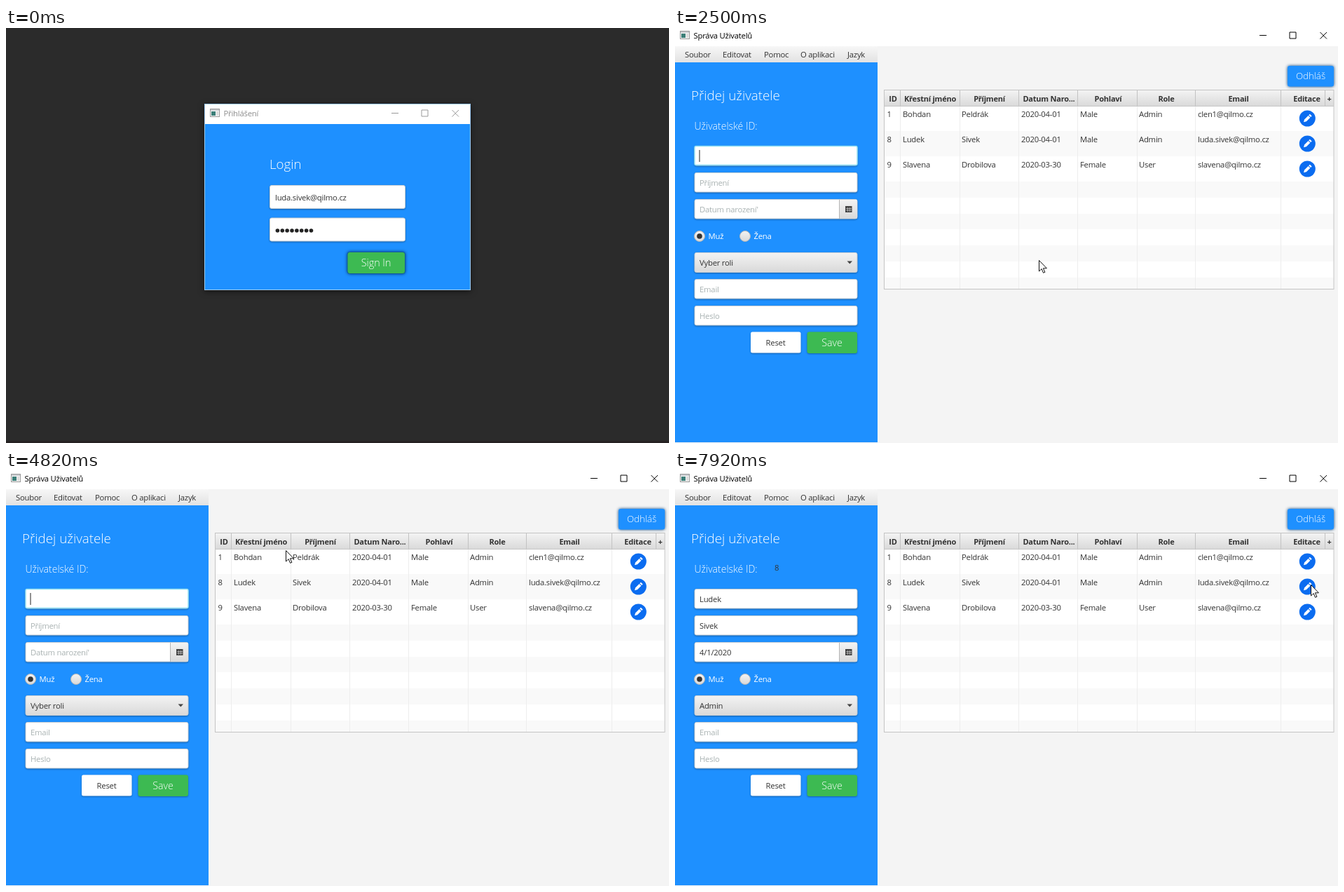
Write an HTML page that moves like this. It is 946 px wide and 592 px high and loops after 8000 ms.

```html
<!DOCTYPE html>
<html lang="cs">
<head>
<meta charset="utf-8">
<title>Správa Uživatelů</title>
<style>
html, body { margin: 0; width: 100%; height: 100%; overflow: hidden; background: #2b2b2b; }
svg { display: block; font: 11.3px "Open Sans", "Noto Sans", sans-serif; letter-spacing: -.02em; }
text { white-space: pre; }
.light { font-weight: 300; letter-spacing: 0; fill: #fff; }
.bold { font-weight: 700; font-size: 11px; }
.mid { text-anchor: middle; }
.glow { filter: drop-shadow(0 0 2px #003c78); }
.soft { filter: drop-shadow(0 1px 1px #0005); }
</style>
</head>
<body>
<svg id="stage" width="946" height="592" viewBox="0 0 946 592"></svg>
<script>
const BLUE = '#1e90ff', GREEN = '#3dba52', INK = '#333', HINT = '#a9b2b2';

const rect = (x, y, w, h, fill, extra = '') =>
  `<rect x="${x}" y="${y}" width="${w}" height="${h}" fill="${fill}" ${extra}/>`;
const text = (x, y, s, cls = '', size = '', fill = INK, id = '') =>
  `<text x="${x}" y="${y}" class="${cls}" fill="${fill}" id="${id}" ${size && `style="font-size:${size}px"`}>${s}</text>`;
const path = (d, stroke, extra = '') => `<path d="${d}" fill="none" stroke="${stroke}" ${extra}/>`;
const field = (x, y, w, h, fill = '#fff') =>
  rect(x + .5, y + .5, w - 1, h - 1, fill, 'rx="2.5" stroke="#c3cdd6" class="soft"');

// Window icon, title and the three window buttons
const titleBar = (x, y, right, title, id = '') =>
  rect(x + .5, y + .5, 13, 11, '#f4f4f4', 'stroke="#999"') +
  rect(x + 1, y + 1, 12, 2, '#c9ccd0') + rect(x + 2, y + 4, 6, 6, '#3c7f78') + rect(x + 9, y + 4, 3, 6, '#dcdcdc') +
  text(x + 19.5, y + 11, title, '', '', '#000', id) +
  path(`M${right - 97} ${y + 6.5}h10m33-4.5h9v9h-9zm43.5 0l9.5 9.5m0-9.5l-9.5 9.5`, '#000', `id="${id}Buttons"`);

const login =
  rect(0, 0, 946, 592, '#2b2b2b') + rect(0, 589, 946, 3, '#262223') +
  rect(283, 108, 380, 266, '#9fcdf8', 'id="frame"') +
  rect(284, 109, 378, 28, '#fff') + rect(284, 137, 378, 236, BLUE) +
  titleBar(291, 115, 647, '', 'caption') +
  text(376, 201, 'Login', 'light', 18.7) +
  field(376, 224, 194, 34) + field(376, 270.5, 194, 34) +
  text(384, 246, 'luda.sivek@qilmo.cz') +
  Array.from({ length: 8 }, (_, i) => `<circle cx="${387.4 + 6.87 * i}" cy="289" r="2.8" fill="#222"/>`).join('') +
  rect(487, 319.5, 82.5, 31, GREEN, 'id="signIn" rx="3.5" stroke="#12599f" class="glow"') +
  text(528, 340, 'Sign In', 'light mid', 14.3);

const menu = [[14, 'Soubor'], [68, 'Editovat'], [127, 'Pomoc'], [179, 'O aplikaci'], [246, 'Jazyk']]
  .map(([x, s]) => text(x, 42, s)).join('');

const radio = (x, label) =>
  `<circle cx="${x}" cy="297" r="7.5" fill="url(#grey)" stroke="#b5b5b5"/>` + text(x + 12.5, 301, label, '', '', '#fff');

const form =
  rect(0, 49, 289, 542, BLUE) +
  text(23, 103, 'Přidej uživatele', 'light', 18.8) +
  text(27.5, 145, 'Uživatelské ID:', 'light', 14) + text(142, 142, '', '', '', INK, 'userId') +
  [168, 206, 244, 358, 396].map(y => field(27.5, y, 233, 28.5)).join('') +
  rect(28, 168.5, 232, 27, '#fff', 'id="focus" rx="2" stroke="#8fe0f4" stroke-width="1.4"') +
  rect(34.5, 174, 1, 17, '#222', 'id="caret"') +
  text(35, 187, '', '', '', INK, 'first') + text(35, 225, '', '', '', INK, 'last') + text(35, 263, '', '', '', INK, 'birth') +
  path('M234.5 245v27', '#b5b5b5') + rect(235, 245, 24.5, 27, 'url(#grey)') +
  rect(243, 254, 9.5, 9, '#444') + path('M244 257.5h8m-8 2.5h8m-5.5-4v6m3-6v6', '#ccc', 'stroke-width=".7"') +
  radio(35, 'Muž') + radio(100, 'Žena') + '<circle cx="35" cy="297" r="3.8" fill="#333"/>' +
  field(27.5, 320, 233, 29, 'url(#grey)') + text(35, 339, '', '', '', INK, 'role') +
  '<path d="M245.5 332.5h7.500l-3.750 4z" fill="#444"/>' +
  text(35, 377, 'Email', '', '', HINT) + text(35, 415, 'Heslo', '', '', HINT) +
  rect(108, 433.5, 71.5, 30, '#fff', 'rx="2.5" class="soft"') + text(143.5, 453, 'Reset', 'mid') +
  rect(188.5, 433.5, 71.5, 30.5, GREEN, 'rx="3" class="soft"') + text(224, 454, 'Save', 'light mid', 14.2);

const headers = [[311, 'ID'], [364, 'Křestní jméno'], [448.5, 'Příjmení'], [533.5, 'Datum Naro...'],
  [618, 'Pohlaví'], [701, 'Role'], [804, 'Email'], [901.5, 'Editace'], [933.5, '+']];
const columns = [302.5, 325, 409, 494, 578, 662, 746];
const users = [
  ['1', 'Bohdan', 'Peldrák', '2020-04-01', 'Male', 'Admin', 'clen1@qilmo.cz'],
  ['8', 'Ludek', 'Sivek', '2020-04-01', 'Male', 'Admin', 'luda.sivek@qilmo.cz'],
  ['9', 'Slavena', 'Drobilova', '2020-03-30', 'Female', 'User', 'slavena@qilmo.cz']
];
const rowTop = i => i < 4 ? 111 + 36 * i : Math.round(219 + 22.8 * (i - 3));
const pencil = y => `<circle cx="902.300" cy="${y}" r="11.5" fill="#0b6cf0"/>
  <g transform="translate(902.3 ${y}) rotate(45)" fill="#fff"><path d="M-2-3.800h4v7.800l-2 3.500-2-3.500z"/><path d="M-2-7h4v2.300h-4z"/></g>`;

const table =
  Array.from({ length: 10 }, (_, i) => {
    const y = rowTop(i), h = Math.min(rowTop(i + 1), 372) - y;
    return rect(299, y, 641, h, i % 2 ? '#f9f9f9' : '#fff') + (i < 9 ? rect(299, y + h, 641, 1, '#ededed') : '');
  }).join('') +
  rect(299, 89, 641, 22, 'url(#head)') +
  [321, 406, 490, 574, 659, 742, 864].map(x => rect(x, 112, 1, 260, '#ededed') + rect(x, 89, 1, 22, '#c2c2c2')).join('') +
  rect(927, 89, 1, 22, '#c2c2c2') + rect(299, 111, 641, 1, '#c6c6c6') +
  rect(298.5, 88.5, 641.5, 284, 'none', 'stroke="#c4c4c4"') +
  headers.map(([x, s]) => text(x, 105, s, 'bold mid')).join('') +
  users.map((user, r) => user.map((s, c) => text(columns[c], 127 + 36 * r, s)).join('') + pencil(129 + 36 * r)).join('');

const main =
  rect(0, 0, 946, 592, '#f4f4f4') + rect(0, 0, 946, 26, '#fff') + titleBar(7, 4, 931, 'Správa Uživatelů', 'app') +
  rect(0, 26, 289, 23, 'url(#bar)') + menu + form + table +
  rect(874, 54, 66, 29.5, BLUE, 'rx="3" class="glow"') + text(907, 73, 'Odhláš', 'light mid', 13.3);

const gradient = (id, from, to) =>
  `<linearGradient id="${id}" x2="0" y2="1"><stop stop-color="${from}"/><stop offset="1" stop-color="${to}"/></linearGradient>`;

stage.innerHTML =
  `<defs>${gradient('grey', '#f3f3f3', '#d9d9d9')}${gradient('head', '#f3f3f3', '#dadada')}${gradient('bar', '#f7f7f7', '#e2e2e2')}</defs>
  <g id="loginView">${login}</g><g id="mainView">${main}</g>
  <path id="arrow" d="M.5 .5v15.500l3.600-3.400 2.500 5.700 2.300-1-2.500-5.500h5z" fill="#fff" stroke="#111" stroke-width="1"/>
  <path id="beam" d="M-3-7.500h2.300l.7.700.7-.7H3M0-7V7M-3 7.500h2.300l.7-.7.7.7H3" fill="none" stroke="#111"/>`;

// Pointer runs: start time, end time, from x, y, to x, y
const runs = [
  [200, 640, 821, 574, 505, 349],
  [1840, 1840, 507, 347, 507, 347],
  [2060, 2500, 508, 346, 519, 331],
  [2610, 2840, 521, 330, 524, 328],
  [3170, 3950, 515, 321, 222, 186],
  [4050, 4390, 219, 177, 397, 111],
  [4720, 5500, 399, 113, 406, 150],
  [5600, 5710, 588, 148, 710, 136],
  [5830, 5940, 830, 142, 926, 160],
  [6260, 6480, 928, 163, 936, 168],
  [6590, 6940, 930, 168, 907, 162]
];

function pointer(t) {
  const run = runs.findLast(r => t >= r[0]);
  if (!run) return null;
  const [start, end, x0, y0, x1, y1] = run;
  const steps = Math.round((end - start) / 110);
  const p = steps ? Math.min(1, Math.floor((t - start) / (end - start) * steps + .05) / steps) : 1;
  return [x0 + (x1 - x0) * p, y0 + (y1 - y0) * p];
}

const byId = id => document.getElementById(id);
const show = (id, on) => byId(id).style.display = on ? '' : 'none';

function fill(id, value, hint = '', hintColor = HINT) {
  byId(id).textContent = value || hint;
  byId(id).setAttribute('fill', value ? INK : hintColor);
}

function draw(now) {
  const t = now % 8000, active = t >= 860, filled = t >= 7920;
  show('loginView', t < 1420);
  show('mainView', t >= 1420);

  byId('caption').textContent = t < 970 ? 'Přihlášení' : 'Správa Uživatelů';
  byId('caption').setAttribute('fill', active ? '#000' : '#8c8c8c');
  byId('captionButtons').setAttribute('stroke', active ? '#000' : '#999');
  byId('frame').style.filter = `drop-shadow(0 2px ${active ? 7 : 4}px #0008)`;
  byId('signIn').setAttribute('rx', active ? 2 : 3.5);

  const caretOn = t < 1840 || Math.floor((t - 1840) / 510) % 2;
  show('focus', !filled);
  show('caret', caretOn && !filled);
  fill('userId', filled && '8');
  fill('first', filled && users[1][1]);
  fill('last', filled && users[1][2], 'Příjmení');
  fill('birth', filled && '4/1/2020', "Datum narození'");
  fill('role', filled && 'Admin', 'Vyber roli', INK);

  const at = pointer(t), typing = at && t >= 1420 && at[0] < 260 && at[1] > 168 && at[1] < 196;
  show('arrow', at && !typing);
  show('beam', typing);
  if (at) byId(typing ? 'beam' : 'arrow').setAttribute('transform', `translate(${at})`);
}

const begin = performance.now();
(function loop() {
  draw(performance.now() - begin);
  requestAnimationFrame(loop);
})();
</script>
</body>
</html>
```
